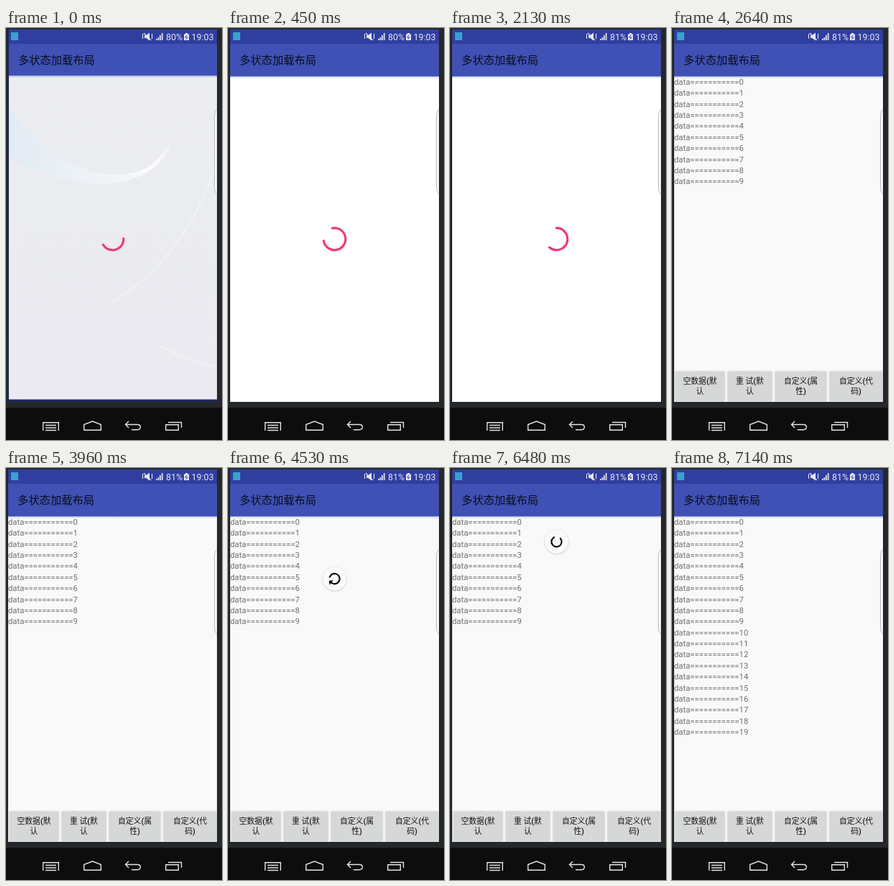
Animation, 301 px wide and 573 px high, one loop 8000 ms. Source, as an HTML page:

```html
<!DOCTYPE html>
<html lang="zh-CN">
<head>
<meta charset="utf-8">
<style>
  html, body { margin: 0; height: 100%; overflow: hidden; background: #0d0d0d; }
  svg { display: block; width: 301px; height: 573px; }
  text { font-family: Roboto, "Noto Sans CJK SC", "Noto Sans CJK", sans-serif; }
  .line { fill: none; stroke: #e4e4e4; stroke-width: 1.4; }
  .status { fill: #e6e8f5; font-size: 12.4px; }
  .row { fill: #707070; font-size: 11.3px; }
  .button { fill: #151515; font-size: 10.8px; font-weight: 500; text-anchor: middle; }
</style>
</head>
<body>
<svg viewBox="0 0 301 573">
  <defs>
    <linearGradient id="glow" x2="1">
      <stop stop-color="#dfeaf4"/><stop offset=".7" stop-color="#f4f8fb"/>
      <stop offset=".9" stop-color="#fff"/><stop offset="1" stop-color="#fff" stop-opacity="0"/>
    </linearGradient>
    <linearGradient id="paper" x2="0" y2="1">
      <stop stop-color="#ecedf0"/><stop offset=".45" stop-color="#eaecf0"/><stop offset="1" stop-color="#ebeaf1"/>
    </linearGradient>
    <clipPath id="content"><rect x="3" y="68" width="291" height="452"/></clipPath>
    <filter id="shadow" x="-30%" y="-30%" width="160%" height="160%">
      <feDropShadow dx="0" dy=".6" stdDeviation=".9" flood-opacity=".3"/>
    </filter>
  </defs>

  <rect width="301" height="528" fill="#25282b"/>
  <rect x="3" y="2" width="291" height="518" fill="#1d2a58"/>
  <g id="app">
    <rect x="3" y="2" width="291" height="20" fill="#303f9f"/>
    <rect x="3" y="22" width="291" height="46" fill="#3f51b5"/>
    <rect id="page" x="3" y="67" width="291" height="453"/>
    <g id="wallpaper" clip-path="url(#content)">
      <rect x="3" y="67" width="291" height="453" fill="url(#paper)"/>
      <path d="M3 112C55 185 110 206 150 206C190 206 212 192 234 150C215 235 90 235 3 180Z" fill="url(#glow)" opacity=".75"/>
      <path d="M3 112C55 185 110 206 150 206C190 206 208 197 224 165" fill="none" stroke="url(#glow)" stroke-width="1.5"/>
      <path d="M294 185C270 270 215 345 145 385" fill="none" stroke="#f3f4f7" stroke-width="1.5"/>
      <path d="M215 445Q260 470 294 474" fill="none" stroke="#f1f2f7" stroke-width="2"/>
    </g>
    <rect x="3" y="67" width="291" height="1" fill="#a4acd9"/>
    <rect x="3" y="68" width="291" height="1.5" fill="#dcdeea"/>
    <text x="16" y="50" font-size="15.3" fill="#0b0d18">多状态加载布局</text>
    <g id="list"></g>
  </g>

  <path d="M294.5 113C291.5 114 290.5 119 290.5 125V219C290.5 226 291.5 230 294.5 231" fill="#fafafa" stroke="#b5b7ba"/>
  <rect x="294" y="2" width="7" height="526" fill="#25282b"/>

  <rect x="7" y="6" width="10" height="11" fill="#3aa0d0"/>
  <g fill="#e6e8f5">
    <path d="M193 10h2.5l4.500-3.500v11l-4.500-3.500H193Z"/>
    <path d="M192 7l10 10M190.500 8v7M203.500 8v7" stroke="#e6e8f5" stroke-width="1.1"/>
    <path d="M209 17v-2h1.700v2ZM211.500 17v-4h1.700v4ZM214 17v-7h1.700v7ZM216.800 17V7h1.700v10Z"/>
    <path d="M248 8.500h2V7h3v1.500h2V17h-7Z"/>
    <path d="M252.200 9.500l-2.500 3.500h3.500l-2.500 3" fill="none" stroke="#303f9f"/>
  </g>
  <text id="battery" class="status" x="223" y="16.500"></text>
  <text class="status" x="258.500" y="16.500">19:03</text>

  <circle id="loader" r="15.300" pathLength="360" fill="none" stroke="#ee3a7b" stroke-width="3.200" stroke-linecap="square"/>
  <g clip-path="url(#content)">
    <g id="refresh">
      <circle r="16.200" fill="#fafafa" filter="url(#shadow)"/>
      <circle id="ring" r="7.100" pathLength="360" fill="none" stroke="#000" stroke-width="2.100" stroke-linecap="square"/>
      <path id="arrow" d="M3 0H11.200L7.100 4.200Z"/>
    </g>
  </g>

  <rect y="528" width="301" height="45" fill="#0d0d0d"/>
  <g class="line">
    <path d="M51.700 560V548.700H73.300V560M55 552.500H70M55 556H70M55 559.500H70"/>
    <path d="M108.700 559.300V551.500L120.500 547L132.300 551.500V559.300Z"/>
    <path d="M171 547L166.500 551.500L171 556M167 551.500H183Q187.300 551.500 187.300 555T183 558.800H175"/>
    <path d="M222.700 551.700H240.300V559.300H222.700ZM226 548.500H244.500V556"/>
  </g>
</svg>
<script>
const $ = id => document.getElementById(id);
const DURATION = 8000, CYCLE = 541;
const CONTENT_AT = 2460, PULL_AT = 3960, PULLED_AT = 4530, RELEASE_AT = 4860;
const SPIN_AT = 5192, MORE_AT = 7000, BATTERY_AT = 1000;

const clamp = x => Math.min(1, Math.max(0, x));
const lerp = (a, b, x) => a + (b - a) * x;
const span = (t, from, to) => clamp((t - from) / (to - from));
const easeOut = x => 1 - (1 - x) ** 2;

// cubic-bezier(.4, 0, .2, 1)
function fastOutSlowIn(x) {
  let lo = 0, hi = 1;
  for (let i = 0; i < 20; i++) {
    const s = (lo + hi) / 2, r = 1 - s;
    if (1.2 * r * r * s + .6 * r * s * s + s ** 3 < x) lo = s; else hi = s;
  }
  return lo * lo * (3 - 2 * lo);
}

// Material indeterminate arc after a number of cycles
function spin(cycles, maxSweep, base) {
  const p = cycles % 1;
  const head = maxSweep * fastOutSlowIn(clamp(2 * p));
  const tail = maxSweep * fastOutSlowIn(clamp(2 * p - 1));
  return { start: base + tail + 90 * p + 216 * cycles + (maxSweep - 270) * Math.floor(cycles), sweep: head - tail };
}

function drawArc(el, { start, sweep }, place = '') {
  el.setAttribute('transform', `${place} rotate(${start})`);
  el.setAttribute('stroke-dasharray', `${Math.max(sweep, .5)} 360`);
}

function addText(cls, x, y, text) {
  return `<text class="${cls}" x="${x}" y="${y}">${text}</text>`;
}

const buttons = [[4, 74, '空数据(默', '认'], [77, 140, '重 试(默', '认'],
                 [143, 216, '自定义(属', '性)'], [219, 294, '自定义(代', '码)']];
const rows = i => addText('row', 3, 79 + i * 15.37, 'data===========' + i);
const range = (from, to, f) => Array.from({ length: to - from }, (_, i) => f(from + i)).join('');
$('list').innerHTML = range(0, 10, rows) + `<g id="more">${range(10, 20, rows)}</g>` +
  buttons.map(([l, r, first, second]) =>
    `<rect x="${l}" y="477" width="${r - l}" height="42.500" rx="1.500" fill="#d6d7d7" stroke="#e6e6e6"/>` +
    addText('button', (l + r) / 2, 495, first) + addText('button', (l + r) / 2, 508.5, second)).join('');

const show = (id, on) => $(id).setAttribute('visibility', on ? 'inherit' : 'hidden');

function drawLoader(t) {
  const opening = span(t, 0, 450);
  const cycles = t < 450 ? lerp(.183, 1.507, opening) : 1.507 + (t - 450) / CYCLE;
  drawArc($('loader'), spin(cycles, 270, -90 + lerp(32, -22, opening)), 'translate(148.5 293.5)');
}

function drawRefresh(t) {
  const pull = easeOut(span(t, PULL_AT, PULLED_AT));
  const settle = easeOut(span(t, RELEASE_AT, RELEASE_AT + 80));
  const y = lerp(lerp(50, 154, pull), 102.5, settle);
  const scale = 1 - span(t, MORE_AT, MORE_AT + 100);
  $('refresh').setAttribute('transform', `translate(148.5 ${y}) scale(${scale})`);

  const finish = span(t, RELEASE_AT + 80, SPIN_AT);
  const arc = t < SPIN_AT
    ? { start: lerp(lerp(-45, 201, pull), 456, finish), sweep: 288 * clamp(pull * 2) * (1 - finish) }
    : spin((t - SPIN_AT) / CYCLE, 288, 96);
  drawArc($('ring'), arc);
  $('ring').setAttribute('opacity', pull < .5 ? .3 : 1);
  $('arrow').setAttribute('opacity', pull < .5 ? .3 : 1);
  $('arrow').setAttribute('transform', `rotate(${arc.start + arc.sweep})`);
  show('arrow', t < RELEASE_AT + 80);
}

function draw(t) {
  const open = easeOut(span(t, 0, 180));
  $('app').setAttribute('transform',
    `translate(${1 - open} 0) scale(${lerp(.9966, 1, open)} ${lerp(.993, 1, open)})`);
  $('wallpaper').setAttribute('opacity', 1 - open);
  const loaded = t >= CONTENT_AT;
  $('page').setAttribute('fill', loaded ? '#f9f9f9' : '#fff');
  $('battery').textContent = t < BATTERY_AT ? '80%' : '81%';
  show('list', loaded);
  show('more', t >= MORE_AT);
  show('loader', !loaded);
  show('refresh', t >= PULL_AT && t < MORE_AT + 100);
  drawLoader(t);
  drawRefresh(t);
}

function tick() {
  draw(performance.now() % DURATION);
  requestAnimationFrame(tick);
}
tick();
</script>
</body>
</html>
```
